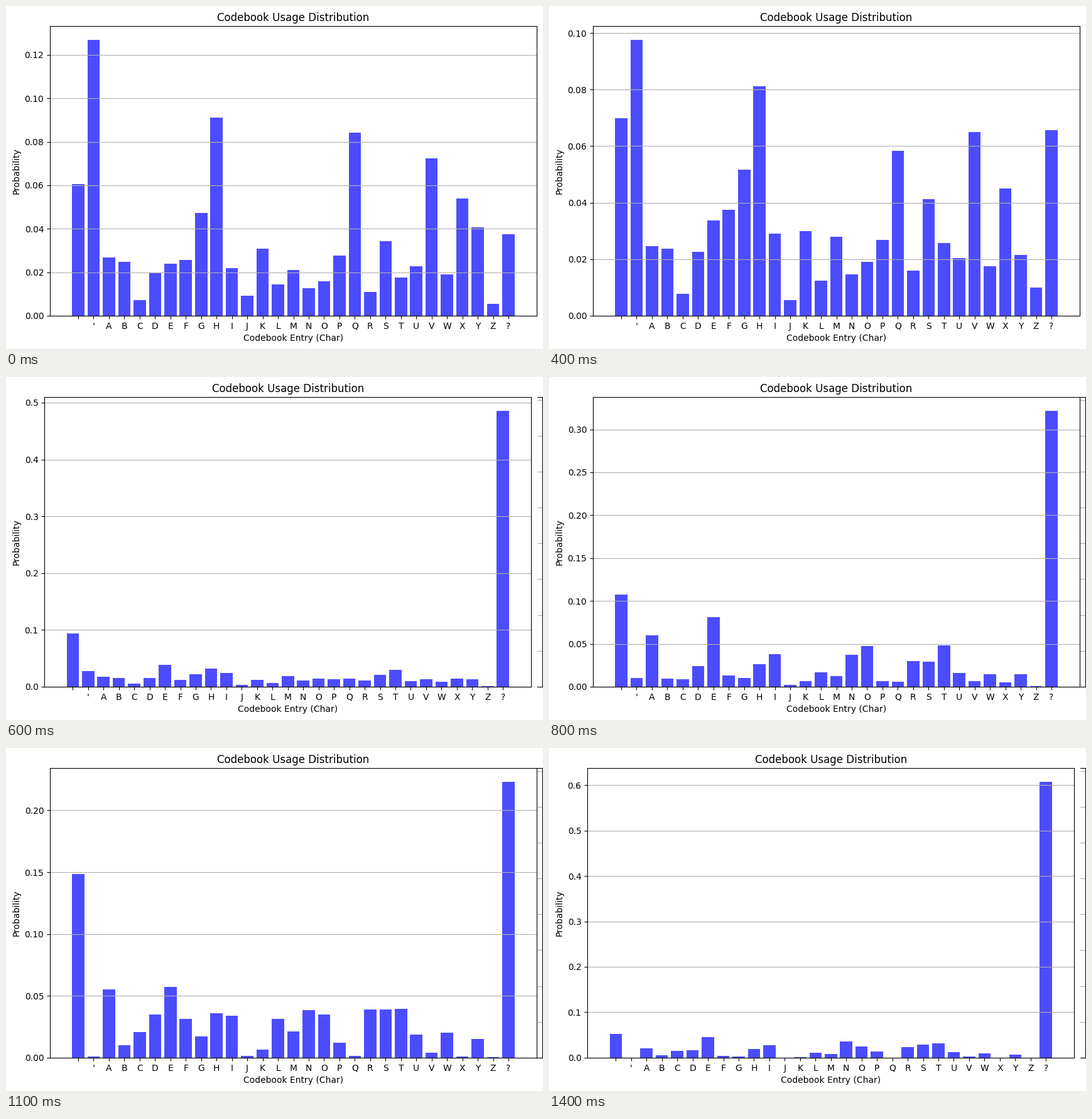
Animation of 855 by 547 pixels, one loop 1500 ms. Source, as a matplotlib script:

```python
import numpy as np
import matplotlib.pyplot as plt
from matplotlib.animation import FuncAnimation
from matplotlib.lines import Line2D
from matplotlib.transforms import IdentityTransform

W, H, DPI = 855, 547, 100
FRAMES, INTERVAL = 15, 100
CHARS = " 'ABCDEFGHIJKLMNOPQRSTUVWXYZ?"

# Axes box in pixels; the left edge moves with the decimals of the tick labels.
LEFT = {1: 61.28, 2: 70.015, 3: 78.85}
BOTTOM, AX_W, AX_H = 53.11, 775, 462

# Usage falls off with rank: each stage has its order of characters and
# the height of the curve (in ten-thousandths) at these ranks.
RANKS = [0, 1, 2, 3, 4, 7, 11, 20, 24, 28]


def stage(order, *curve):
    by_rank = np.interp(range(len(order)), RANKS, curve) / 1e4
    return np.array([by_rank[order.index(c)] for c in CHARS])


STAGES = [
    stage("'HQV XGY?SKPAFBEUIMDWTOLNRJCZ", 1269, 911, 842, 724, 605, 407, 277, 190, 127, 55),
    stage("'HQVX GS?KYFABUIPEMDWOLTNRJZC", 1168, 855, 796, 743, 576, 374, 289, 183, 151, 56),
    stage("'H ?VQGXSFEKIMPTABDYUOWRNLZCJ", 976, 811, 698, 656, 650, 450, 300, 204, 146, 55),
    stage("? EHT'IGSMABDOQXYPVFKRNUWLCJZ", 4857, 939, 387, 320, 298, 221, 155, 122, 88, 11),
    stage("? EAOTNIRSDHLUWYFCMBGKPVJ'QXZ", 2397, 1138, 1024, 812, 643, 441, 234, 44, 22, 5),
    stage("? AHSFRDLENTIMCGWOUPYBKVJQXZ'", 2148, 1655, 420, 420, 415, 381, 307, 151, 14, 4),
    stage("? ENTSIORAHDCPULWMYBFGVKJXQ'Z", 6073, 524, 455, 359, 317, 248, 165, 41, 3, 1),
]

# Stage reached at each time step; the spike sets in slowly.
STEPS = [0, 2, 4, 5, 6, 9, 12, 14]
PHASES = [0, 1, 2, 2.302, 3, 4, 5, 6]


def usage(i):
    phase = np.interp(i, STEPS, PHASES)
    k = min(int(phase), len(STAGES) - 2)
    w = phase - k
    return (1 - w) * STAGES[k] + w * STAGES[k + 1]


def axes_box(decimals):
    return [LEFT[decimals] / W, BOTTOM / H, AX_W / W, AX_H / H]


fig = plt.figure(figsize=(W / DPI, H / DPI), dpi=DPI, facecolor="white")
ax = fig.add_axes(axes_box(2))
bars = ax.bar(range(len(CHARS)), usage(0), color="blue", alpha=0.7)
ax.set_xticks(range(len(CHARS)), list(CHARS))
ax.set_xlabel("Codebook Entry (Char)")
ax.set_ylabel("Probability")
ax.set_title("Codebook Usage Distribution")
ax.grid(axis="y")


def edge_line(xs, ys, color):
    line = Line2D(xs, ys, color=color, lw=0.8, transform=IdentityTransform())
    return fig.add_artist(line)


# Strip left at the right border by the widest layout.
top = BOTTOM + AX_H
strip = [edge_line([846, 853], [BOTTOM + 57.15 * k] * 2, "#b0b0b0") for k in range(1, 9)]
strip += [edge_line([846, 854], [y, y], "black") for y in (BOTTOM, top)]
strip.append(edge_line([854, 854], [BOTTOM, top], "black"))


def update(i):
    values = usage(i)
    for bar, v in zip(bars, values):
        bar.set_height(v)
    ax.set_ylim(0, 1.05 * values.max())
    labels = ax.yaxis.get_major_formatter().format_ticks(ax.yaxis.get_majorticklocs())
    ax.set_position(axes_box(len(labels[0].split(".")[1])))
    for line in strip:
        line.set_visible(i > 5)
    return list(bars) + strip


anim = FuncAnimation(fig, update, frames=FRAMES, interval=INTERVAL,
                     repeat=True, repeat_delay=0, blit=False)
plt.show()
```
